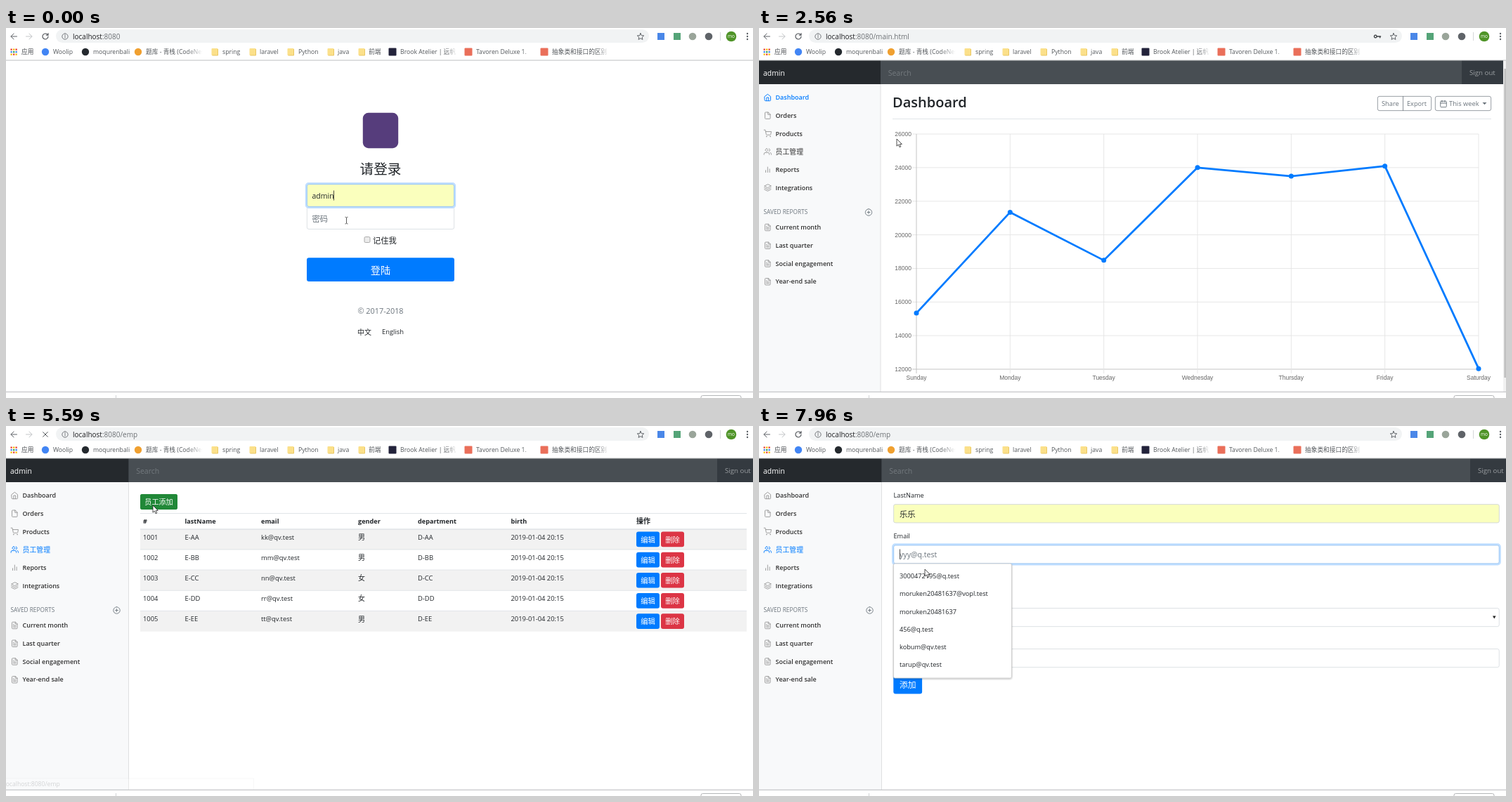
These frames come from a looping animation (1063 by 527 pixels, 8000 ms). An HTML page:

```html
<!DOCTYPE html>
<html lang="zh">
<head>
<meta charset="utf-8">
<title>Admin demo</title>
<style>
html, body { margin: 0; width: 100%; height: 100%; overflow: hidden; background: #fff; }
svg { display: block; width: 1063px; height: 527px; }
text { font-family: 'Open Sans', 'Noto Sans CJK SC', 'Noto Sans CJK', sans-serif; white-space: pre; }
.chart text { font-family: 'Liberation Sans', Arial, sans-serif; }
</style>
</head>
<body>
<svg id="stage" viewBox="0 0 1063 527" xmlns="http://www.w3.org/2000/svg"></svg>
<script>
const LOOP = 8000, BEFORE = -999, AFTER = 9999;
const BLUE = '#007bff', INK = '#212529', GRAY = '#6c757d', EDGE = '#ced4da', RULE = '#dee2e6', YELLOW = '#faffbd';

const ICONS = {
  home: 'M3 9l9-7 9 7v11a2 2 0 0 1-2 2H5a2 2 0 0 1-2-2zM9 22V12h6v10',
  file: 'M13 2H6a2 2 0 0 0-2 2v16a2 2 0 0 0 2 2h12a2 2 0 0 0 2-2V9zM13 2v7h7',
  cart: 'M1 1h4l2.7 13.4a2 2 0 0 0 2 1.6h9.7a2 2 0 0 0 2-1.6L23 6H6M9 20a1 1 0 1 0 .01 0M20 20a1 1 0 1 0 .01 0',
  users: 'M17 21v-2a4 4 0 0 0-4-4H5a4 4 0 0 0-4 4v2M9 3a4 4 0 1 0 .01 0M23 21v-2a4 4 0 0 0-3-3.87M16 3.13a4 4 0 0 1 0 7.75',
  bars: 'M18 20V10M12 20V4M6 20v-6',
  layers: 'M12 2L2 7l10 5 10-5zM2 17l10 5 10-5M2 12l10 5 10-5',
  doc: 'M14 2H6a2 2 0 0 0-2 2v16a2 2 0 0 0 2 2h12a2 2 0 0 0 2-2V8zM14 2v6h6M16 13H8M16 17H8M10 9H8',
  date: 'M5 4h14a2 2 0 0 1 2 2v14a2 2 0 0 1-2 2H5a2 2 0 0 1-2-2V6a2 2 0 0 1 2-2zM16 2v4M8 2v4M3 10h18',
  plus: 'M12 2a10 10 0 1 0 .01 0M12 8v8M8 12h8',
  info: 'M12 2a10 10 0 1 0 .01 0M12 11v6M12 6v2.5',
  reload: 'M20 12a8 8 0 1 1-2.3-5.7L20 8.5M20 3v5.5h-5.5',
  stop: 'M4 4l16 16M20 4L4 20',
  back: 'M21 12H4M12 4l-8 8 8 8',
  forward: 'M3 12h17M12 4l8 8-8 8',
  star: 'M12 3l2.7 6.2 6.8.6-5.1 4.5 1.5 6.6L12 17.4l-5.9 3.5 1.5-6.6L2.5 9.8l6.8-.6z',
  key: 'M6 8a4 4 0 1 0 .01 0M10 12h12M20 12v4'
};

// Drawing helpers: text is placed by its vertical centre.
const text = (x, cy, s, size, fill = INK, more = '') =>
  `<text x="${x}" y="${cy + size * .36}" font-size="${size}" fill="${fill}" ${more}>${s}</text>`;
const mid = 'text-anchor="middle"';
const rect = (x, y, w, h, fill, more = '') =>
  `<rect x="${x}" y="${y}" width="${w}" height="${h}" fill="${fill}" ${more}/>`;
const disc = (x, y, r, fill) => `<circle cx="${x}" cy="${y}" r="${r}" fill="${fill}"/>`;
const path = (d, stroke, width = 1, fill = 'none') =>
  `<path d="${d}" stroke="${stroke}" stroke-width="${width}" fill="${fill}"/>`;
const icon = (name, x, y, color = '#999', size = 11.3, width = 2) =>
  `<path d="${ICONS[name]}" transform="translate(${x - size / 2} ${y - size / 2}) scale(${size / 24})"
    fill="none" stroke="${color}" stroke-width="${width}" stroke-linecap="round" stroke-linejoin="round"/>`;
const show = (from, to, body, fade = 0) =>
  `<g class="timed" data-from="${from}" data-to="${to}" data-fade="${fade}">${body}</g>`;

const box = (x, y, w, h, fill = '#fff', edge = EDGE) =>
  rect(x + .35, y + .35, w - .7, h - .7, fill, `rx="2.5" stroke="${edge}" stroke-width=".7"`);
const ring = (x, y, w, h) =>
  rect(x - 1.1, y - 1.1, w + 2.2, h + 2.2, 'none', 'rx="3.6" stroke="#bfdeff" stroke-width="2.2"') +
  rect(x + .35, y + .35, w - .7, h - .7, 'none', 'rx="2.5" stroke="#80bdff" stroke-width=".7"');
const button = (x, y, w, h, fill, label, size) =>
  rect(x, y, w, h, fill, 'rx="3"') + text(x + w / 2, y + h / 2 + .5, label, size, '#fff', mid);
const caret = (x, cy) => rect(x, cy - 7, .8, 14, '#222');

function toolbar() {
  const marks = [
    [67, 'Woolip', 56, '#4285f4'], [124, 'moqurenbali', 113, '#24292e'],
    [199, '题库 - 青栈 (CodeNes', 188, '#f0a030', 258, 280],
    [308, 'spring', 297], [361, 'laravel', 351], [416, 'Python', 405], [472, 'java', 462], [516, '前端', 506],
    [561, 'Brook Atelier | 远帆', 550, '#23233b', 625, 642],
    [669, 'Tavoren Deluxe 1.', 658, '#ea6f5a', 735, 750], [777, '抽象类和接口的区别', 766, '#ea6f5a', 842, 858]
  ];
  let s = rect(0, 0, 1063, 46, '#fff') + rect(71, 2, 844, 19, '#f1f3f4', 'rx="9.5"') +
    icon('back', 11, 12, '#5f6368', 12) + icon('forward', 33, 12, '#c4c6c8', 12) + icon('info', 84, 12, '#5f6368', 10) +
    icon('star', 903, 12, '#5f6368', 12) +
    rect(927, 7, 10, 10, '#4a87e8') + rect(950, 7, 10, 10, '#55a478') + disc(977, 12, 5.3, '#9aa59a') +
    disc(1000, 12, 5.3, '#5f6368') + rect(1016, 6, 1, 12, '#d5d7da') + disc(1032, 12, 7.3, '#4f9428') +
    text(1032, 12, 'mo', 6.5, '#fff', mid);
  for (const y of [8, 12, 16]) s += disc(1055, y, 1.2, '#5f6368');
  const dots = ['#ea4335', '#34a853', '#fbbc05', '#4285f4'];
  for (let i = 0; i < 9; i++) s += rect(6.5 + i % 3 * 3.5, 29.5 + (i / 3 | 0) * 3.5, 2.3, 2.3, dots[(i * 2 + (i / 3 | 0)) % 4]);
  s += text(22, 34, '应用', 8.7, '#45494d');
  for (const [x, label, ix, color, a, b] of marks) {
    s += color ? (ix > 500 ? rect(ix - 5.5, 28.5, 11, 11, color, 'rx="1"') : disc(ix, 34, 5.2, color))
      : rect(ix - 4.5, 29, 9, 10, '#fbe08a', 'rx="1"') + path(`M${ix - 3.5} 39h8v-9`, '#e9c765', 1);
    s += text(x, 34, label, 8.7, '#54585c');
    if (a) s += rect(a, 27, b - a, 15, 'url(#fade)') + rect(b, 27, 8, 15, '#fff');
  }
  s += rect(0, 45.5, 1063, 1, '#bdbfc1');

  const host = 'localhost<tspan fill="#6b6f73">:8080';
  const url = (from, to, tail) => show(from, to, text(95, 12, host + tail + '</tspan>', 10, '#202124'));
  s += url(BEFORE, 1650, '') + url(1650, 4280, '/main.html') + url(4280, 5510, '/emps') + url(5510, AFTER, '/emp');
  s += show(610, 4280, icon('key', 880, 12, '#3c4043', 11, 3));
  const loads = [1220, 2240, 3920, 4480, 5440, 5660];
  [BEFORE, ...loads].forEach((from, i) =>
    s += show(from, loads[i] ?? AFTER, icon(i % 2 ? 'stop' : 'reload', 56, 12, '#4d5156', i % 2 ? 10 : 12, 2.3)));
  return s;
}

function login() {
  const X = 428, W = 210, H = 32.4, Y1 = 222.3, Y2 = 254.4;
  let s = rect(507.8, 120.8, 50.4, 50.4, '#563d7c', 'rx="8"') + text(533, 201, '请登录', 19.6, INK, mid) +
    box(X, Y2, W, H) + box(X, Y1, W, H, YELLOW) + text(435.5, 239, 'admin', 10.5) +
    show(BEFORE, 120, ring(X, Y1, W, H), 170) + show(130, AFTER, ring(X, Y2, W, H), 170) +
    show(BEFORE, 120, caret(466, 238.5)) +
    show(BEFORE, 450, text(435.5, 271.5, '密码', 11.3, GRAY));
  const typed = [200, 450, 530, 610, 1220];
  for (let i = 0; i < 4; i++) {
    s += show(typed[i], typed[i + 1], caret(435 + i * 4.6, 271));
    if (i) s += show(typed[i], AFTER, disc(433 + i * 4.6, 271.5, 1.7, '#333'));
  }
  return s + rect(510, 297.5, 8, 8, '#ececec', 'rx="1.5" stroke="#999" stroke-width=".8"') +
    text(522, 302.5, '记住我', 11.3) + button(X, 327.3, W, 33.6, BLUE, '登陆', 14.2) +
    text(533, 403.5, '© 2017-2018', 10.9, GRAY, mid) + text(500, 433, '中文', 10) + text(535, 433, 'English', 9.4);
}

// Top bar and side menu shared by the inner pages.
function shell(side, out, active) {
  const menu = [['home', 'Dashboard'], ['file', 'Orders'], ['cart', 'Products'], ['users', '员工管理'], ['bars', 'Reports'], ['layers', 'Integrations']];
  const bold = 'font-weight="600"';
  let s = rect(0, 46, 1063, 472, '#fff') + rect(0, 80, side, 438, '#f8f9fa') + rect(side - .5, 80, 1, 438, '#dfe0e1') +
    rect(0, 46, 1063, 34, '#343a40') + rect(0, 46, side, 34, '#25292d') + rect(side, 46, out - side, 34, '#484e53') +
    text(6, 64, 'admin', 10.4, '#fff') + text(side + 10.7, 64, 'Search', 10.5, '#73797e') +
    text(out + 11, 64, 'Sign out', 9.7, '#999da0');
  menu.forEach(([name, label], i) => {
    const y = 99 + i * 25.7, on = i === active;
    s += icon(name, 12.3, y, on ? BLUE : '#999') + text(23.5, y, label, label > 'z' ? 9.9 : 9, on ? BLUE : '#333', label > 'z' ? '' : bold);
  });
  s += text(6.5, 262.5, 'SAVED REPORTS', 8.3, GRAY) + icon('plus', side - 17, 262.5, GRAY);
  ['Current month', 'Last quarter', 'Social engagement', 'Year-end sale'].forEach((label, i) => {
    const y = 284 + i * 25.75;
    s += icon('doc', 12.3, y) + text(23.5, y, label, 9, '#333', bold);
  });
  return s;
}

function chart(grow, right, bottom) {
  const days = ['Sunday', 'Monday', 'Tuesday', 'Wednesday', 'Thursday', 'Friday', 'Saturday'];
  const sales = [15339, 21345, 18483, 24003, 23489, 24092, 12034];
  const L = 224, T = 151, dx = (right - L) / 6, dy = (bottom - T) / 7;
  let s = '', pts = [];
  for (let i = 0; i < 8; i++) {
    const y = T + i * dy;
    s += path(`M${L - 6} ${y}H${right}`, i === 7 ? '#bfbfbf' : '#e5e5e5', .9) +
      text(217, y, 26000 - i * 2000, 8.5, '#666', 'text-anchor="end"');
  }
  days.forEach((day, i) => {
    const x = L + i * dx;
    s += path(`M${x} ${T}V${bottom + 6}`, i ? '#e5e5e5' : '#bfbfbf', .9) + text(x, bottom + 11.7, day, 8.5, '#666', mid);
    pts.push([x, bottom - (sales[i] - 12000) / 2000 * dy * grow]);
  });
  s += `<polyline points="${pts}" fill="none" stroke="${BLUE}" stroke-width="2.8" stroke-linejoin="round"/>`;
  for (const [x, y] of pts) s += disc(x, y, 3.5, BLUE);
  return `<g class="chart">${s}</g>`;
}

function dashboard() {
  return shell(173, 1000, 0) + text(190, 106, 'Dashboard', 20, INK, 'font-weight="600"') +
    box(880, 97, 77, 21, '#fff', GRAY) + rect(916, 97, .8, 21, GRAY) + box(962, 97, 80, 21, '#fff', GRAY) +
    text(886, 108, 'Share', 9.3, GRAY) + text(922, 108, 'Export', 9.2, GRAY) +
    icon('date', 974, 108, GRAY) + text(982, 108, 'This week', 9.3, GRAY) + `<path d="M1029.5 106h6l-3 3.2z" fill="${GRAY}"/>` +
    rect(190, 129, 852, .9, RULE) +
    show(BEFORE, 2240, chart(.128, 1033, 490.5)) + show(2240, AFTER, chart(1, 1024, 486)) +
    show(3410, AFTER, icon('users', 12.3, 176.1, INK)) +
    rect(1059, 46, 4, 472, '#f1f1f1') + rect(1060.3, 58, 3, 440, '#c1c1c1');
}

function staff() {
  const cols = [195, 254.5, 363, 501, 586, 718.5, 897];
  let s = shell(174.5, 1012, 3) + button(191, 97, 53, 22, '#28a745', '员工添加', 10.1) +
    show(5300, AFTER, button(191, 97, 53, 22, '#218838', '员工添加', 10.1)) + rect(191, 124, 863, .9, RULE);
  ['#', 'lastName', 'email', 'gender', 'department', 'birth', '操作'].forEach((h, i) =>
    s += text(cols[i], 135.5, h, i < 6 ? 9.15 : 10, INK, 'font-weight="700"'));
  [...'AABBCCDDEE'.matchAll(/../g)].forEach(([id], i) => {
    const y = 147 + i * 29.15, who = 'kmnrt'[i].repeat(2);
    if (i % 2 === 0) s += rect(191, y, 863, 29.15, '#f2f2f2');
    s += rect(191, y - .7, 863, i ? .9 : 1.4, RULE);
    [1001 + i, 'E-' + id, who + '@qv.test', i === 2 || i === 3 ? '女' : '男', 'D-' + id, '2019-01-04 20:15'].forEach((v, c) =>
      s += text(cols[c], y + 11.3, v, c === 3 ? 10 : 9.4));
    s += button(897, y + 3.6, 33, 21.7, BLUE, '编辑', 10.3) + button(932, y + 3.6, 33, 21.7, '#dc3545', '删除', 10.3);
  });
  return s;
}

function suggest(y, w, items, hot) {
  let s = rect(191.5, y, w, 163, '#fff', 'rx="2" stroke="#c8c8c8" stroke-width=".8" filter="url(#shadow)"');
  if (hot) s += show(hot, AFTER, rect(192, y + 5.5, w - 1, 25, '#eee'));
  items.forEach((v, i) => s += text(200, y + 18 + i * 25.15, v, 9.2));
  return s;
}

function form() {
  const X = 191.3, W = 862.3, H = 26.8, NAME = 111.3, MAIL = 169.5;
  const label = (y, s) => text(191.5, y, s, 9.2);
  const radio = (x, on) => `<circle cx="${x}" cy="231" r="4" fill="#fff" stroke="#a0a0a0" stroke-width=".8"/>` + (on ? disc(x, 231, 2, '#555') : '');
  const names = ['乐乐', '乐乐kobumeralo', 'moru', 'K-Obuven', 'tarupel', 'K-obumeralotarupelin45'];
  const mails = ['3000472195@q.test', 'moruken20481637@vopl.test', 'moruken20481637', '456@q.test', 'kobum@qv.test', 'tarup@qv.test'];
  return shell(174.5, 1012, 3) +
    label(99, 'LastName') + box(X, NAME, W, H) + show(BEFORE, 6840, text(200, 125.5, 'wenbohai', 10.6, GRAY)) +
    show(6840, AFTER, box(X, NAME, W, H, YELLOW) + text(200, 125.5, '乐乐', 11.3)) +
    label(157, 'Email') + box(X, MAIL, W, H) + text(200, 183.5, 'yyy@q.test', 10.6, GRAY) +
    label(215, 'Gender') + radio(196, false) + text(203, 231, '男', 10) + radio(222, false) + text(229, 231, '女', 10) +
    label(247, 'department') + box(X, 259.2, W, H) + text(200, 272.5, 'D-AA', 10.6, '#495057') +
    '<path d="M1044 270.5h4.6l-2.3 4z" fill="#222"/>' +
    label(305, 'Birth') + box(X, 317.2, W, H) + text(200, 331, '2017/01/01 12:23', 10.6, GRAY) +
    button(X, 354.6, 40.8, 26.8, BLUE, '添加', 11.8) +
    show(6420, 7580, ring(X, NAME, W, H), 120) + show(6500, 6840, caret(200, 124.5)) +
    show(7590, AFTER, ring(X, MAIL, W, H), 120) + show(7660, AFTER, caret(200, 182.5)) +
    show(6570, 7180, suggest(138, 134.5, names, 6840)) + show(7740, AFTER, suggest(196, 168, mails));
}

function status() {
  const bar = s => rect(-1, 502, 353.5, 17, '#fff', 'stroke="#dcdee0" stroke-width=".8"') + text(-2.5, 510, s, 8.6, '#6b6f73');
  const link = 'localhost:8080/emp';
  return show(1450, 2410, bar('正在等待 localhost 的响应...'), 150) + show(3110, 4000, bar(link + 's'), 130) +
    show(4780, 4930, bar(link + 's'), 120) + show(5300, 5510, bar(link), 110);
}

const footer = rect(0, 518, 1063, 9, '#fff') + rect(0, 517.8, 1063, 1, '#b8babc') + rect(156, 523, 1, 4, '#d0d2d4') +
  rect(989, 523.5, 57, 12, '#fff', 'rx="2.5" stroke="#b4b6b8"');

const SHAPES = {
  beam: path('M-2 -4.7q1.6 0 2 .8v8q-.4.8-2 .8M2 -4.7q-1.6 0-2 .8M0 4.1q.4.8 2 .8', '#333', .8),
  arrow: path('M0 0V10.2L2.4 8 4 11.7 5.8 11 4.2 7.4H7.4Z', '#222', .8, '#fff'),
  hand: path('M-1.2 6V.6q1.1-1.2 2.2 0V4.5l4.5 1q1.2.4 1 1.8l-.7 3.2-1 2.3H-.5L-3.8 8.2q.2-1.5 2.6 .3z', '#222', .8, '#fff')
};
const shapeAt = [[0, 'beam'], [1010, ''], [1450, 'beam'], [2240, 'arrow'], [3920, 'hand'], [4850, 'arrow'], [5950, 'beam'], [6640, 'arrow'], [7330, 'beam'], [7800, 'arrow']];
// Pointer moves: start, end, number of jumps, target x, target y.
const moves = [
  [2240, 2241, 1, 479, 262], [2410, 2560, 3, 196, 158], [2820, 3040, 4, 110, 150], [3110, 3480, 6, 48, 172],
  [3920, 3921, 1, 48, 174.5], [4780, 5370, 9, 209, 113], [5800, 6080, 4, 227, 125], [6570, 6680, 2, 226, 150],
  [6900, 7040, 3, 231, 163], [7260, 7410, 3, 241, 179], [7800, 7960, 3, 236, 204]
];

function pointer(t) {
  let x = 484.5, y = 274;
  for (const [from, to, n, tx, ty] of moves) {
    if (t < from) break;
    const k = Math.min(n, Math.floor((t - from) / (to - from) * (n - 1)) + 1) / n;
    x += (tx - x) * k;
    y += (ty - y) * k;
  }
  return [x, y];
}

const stage = document.getElementById('stage');
stage.innerHTML = `<defs>
  <linearGradient id="fade"><stop offset="0" stop-color="#fff" stop-opacity="0"/><stop offset="1" stop-color="#fff"/></linearGradient>
  <filter id="shadow" x="-5%" y="-5%" width="110%" height="112%"><feDropShadow dx="0" dy="1" stdDeviation="1" flood-opacity=".3"/></filter>
  </defs>` + rect(0, 0, 1063, 527, '#fff') +
  show(BEFORE, 2090, login()) + show(2090, 4340, dashboard()) + show(4340, 5730, staff()) + show(5730, AFTER, form()) +
  status() + footer + toolbar() +
  '<g id="pointer">' + Object.entries(SHAPES).map(([k, s]) => `<g data-shape="${k}">${s}</g>`).join('') + '</g>';

const timed = [...stage.querySelectorAll('.timed')].map(el =>
  ({ el, from: +el.dataset.from, to: +el.dataset.to, fade: +el.dataset.fade }));
const hand = document.getElementById('pointer');
const clamp = v => Math.max(0, Math.min(1, v));

function draw(t) {
  for (const { el, from, to, fade } of timed) {
    const alpha = fade ? clamp((t - from) / fade) * clamp(1 - (t - to) / fade) : +(t >= from && t < to);
    el.style.display = alpha ? '' : 'none';
    el.style.opacity = alpha;
  }
  const shape = shapeAt.filter(([at]) => at <= t).pop()[1];
  hand.setAttribute('transform', `translate(${pointer(t)})`);
  for (const g of hand.children) g.style.display = g.dataset.shape === shape ? '' : 'none';
}

const start = performance.now();
function tick() {
  draw((performance.now() - start) % LOOP);
  requestAnimationFrame(tick);
}
tick();
</script>
</body>
</html>
```
